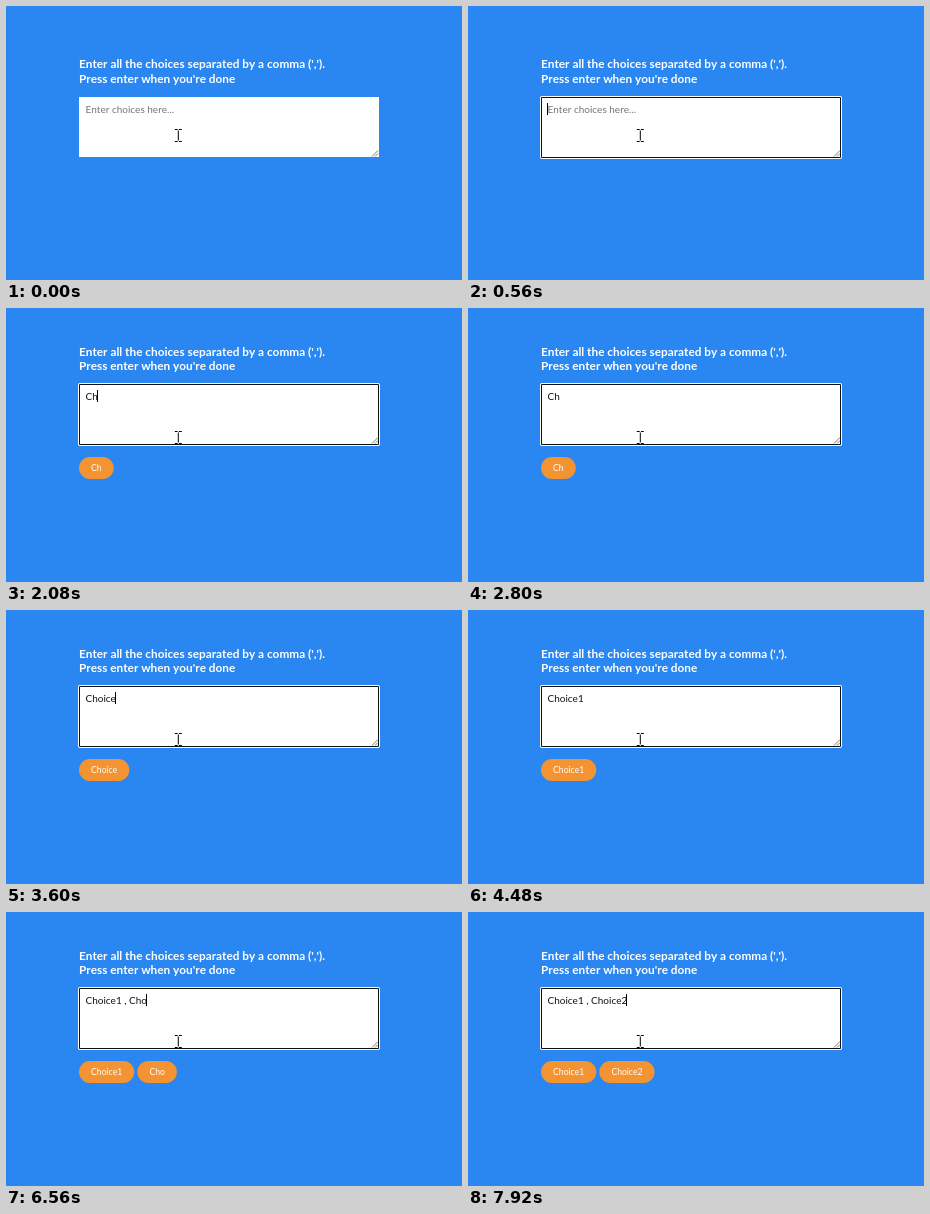
An HTML page with a canvas for the animation above (8 s loop, 456 by 274 pixels).

```html
<!DOCTYPE html>
<html lang="en">
<head>
<meta charset="utf-8">
<title>Choice picker</title>
<style>
  html, body { margin: 0; width: 100%; height: 100%; overflow: hidden; background: #2a86f1; }
  canvas { display: block; width: 456px; height: 274px; }
</style>
</head>
<body>
<canvas id="stage"></canvas>
<script>
const W = 456, H = 274, LOOP = 8000;
const FOCUS = 320, BLINK = 500;
// Each burst of typing keeps a steady pace.
const BURSTS = [
  { text: 'Cho', start: 1200, step: 880 },
  { text: 'ice1', start: 3140, step: 220 },
  { text: ' , Cho', start: 4720, step: 320 },
  { text: 'ice2', start: 6720, step: 260 },
];
const FACE = 'Lato, "Open Sans", sans-serif';
const BLUE = '#2a86f1', ORANGE = '#f39332', INK = '#111';

const canvas = document.getElementById('stage');
const ctx = canvas.getContext('2d');
const dpr = window.devicePixelRatio || 1;
canvas.width = W * dpr;
canvas.height = H * dpr;

function box(x, y, w, h, r, color) {
  ctx.fillStyle = color;
  ctx.beginPath();
  ctx.roundRect(x, y, w, h, r);
  ctx.fill();
}

function label(str, x, y, font, color) {
  ctx.font = `${font} ${FACE}`;
  ctx.fillStyle = color;
  ctx.fillText(str, x, y);
  return ctx.measureText(str).width;
}

function line(color, width, x1, y1, x2, y2) {
  ctx.strokeStyle = color;
  ctx.lineWidth = width;
  ctx.beginPath();
  ctx.moveTo(x1, y1);
  ctx.lineTo(x2, y2);
  ctx.stroke();
}

function typing(t) {
  let typed = '', last = FOCUS;
  for (const { text, start, step } of BURSTS) {
    if (t < start) break;
    const n = Math.min(text.length, Math.floor((t - start) / step) + 1);
    typed += text.slice(0, n);
    last = start + (n - 1) * step;
  }
  return { typed, last };
}

function drawHeading(top) {
  const font = 'bold 11.8px';
  label("Enter all the choices separated by a comma (',').", 73, Math.round(top - 28.5), font, '#fff');
  label("Press enter when you're done", 73, Math.round(top - 14), font, '#fff');
}

function drawField(top, typed, focused, caretOn) {
  if (focused) {
    box(72, top - 1, 302, 63, 2, '#fff');
    box(73, top, 300, 61, 1, INK);
    box(74, top + 1, 298, 59, 0, '#fff');
  } else {
    box(73, top, 300, 60, 0, '#fff');
  }
  for (const d of [6, 3]) line('#555', 0.8, 372 - d, top + 59.5, 372, top + 59.5 - d);

  const base = top + 16;
  const hint = label(typed || 'Enter choices here...', 79.5, base, '10px', typed ? INK : '#757575');
  if (caretOn) {
    const x = Math.floor(79 + (typed ? hint : 0)) + 0.5;
    line('#000', 1, x, base - 10, x, base + 2);
  }
}

function drawChips(typed) {
  let x = 73;
  for (const name of typed.split(',').map(s => s.trim()).filter(Boolean)) {
    ctx.font = `8.6px ${FACE}`;
    const w = ctx.measureText(name).width + 24.2;
    box(x, 149, w, 22, 11, ORANGE);
    label(name, x + 12.1, 163, '8.6px', '#fff');
    x += w + 3;
  }
}

function drawPointer(x, y) {
  line('#000', 1, x, y - 5, x, y + 5);
  for (const end of [-6, 6]) {
    for (const side of [-1, 1]) line('#000', 1, x + side * 0.6, y + end, x + side * 3.5, y + end);
  }
}

function draw(t) {
  const { typed, last } = typing(t);
  const focused = t >= FOCUS;
  const caretOn = focused && (t - last) % (2 * BLINK) < BLINK;
  const top = typed ? 76.2 : 90.7;

  ctx.setTransform(dpr, 0, 0, dpr, 0, 0);
  ctx.fontKerning = 'none';
  ctx.fillStyle = BLUE;
  ctx.fillRect(0, 0, W, H);
  drawHeading(top);
  drawField(Math.round(top), typed, focused, caretOn);
  drawChips(typed);
  drawPointer(172.3, 129.5);
}

const start = performance.now();
function tick() {
  draw((performance.now() - start) % LOOP);
  requestAnimationFrame(tick);
}
tick();
</script>
</body>
</html>
```
